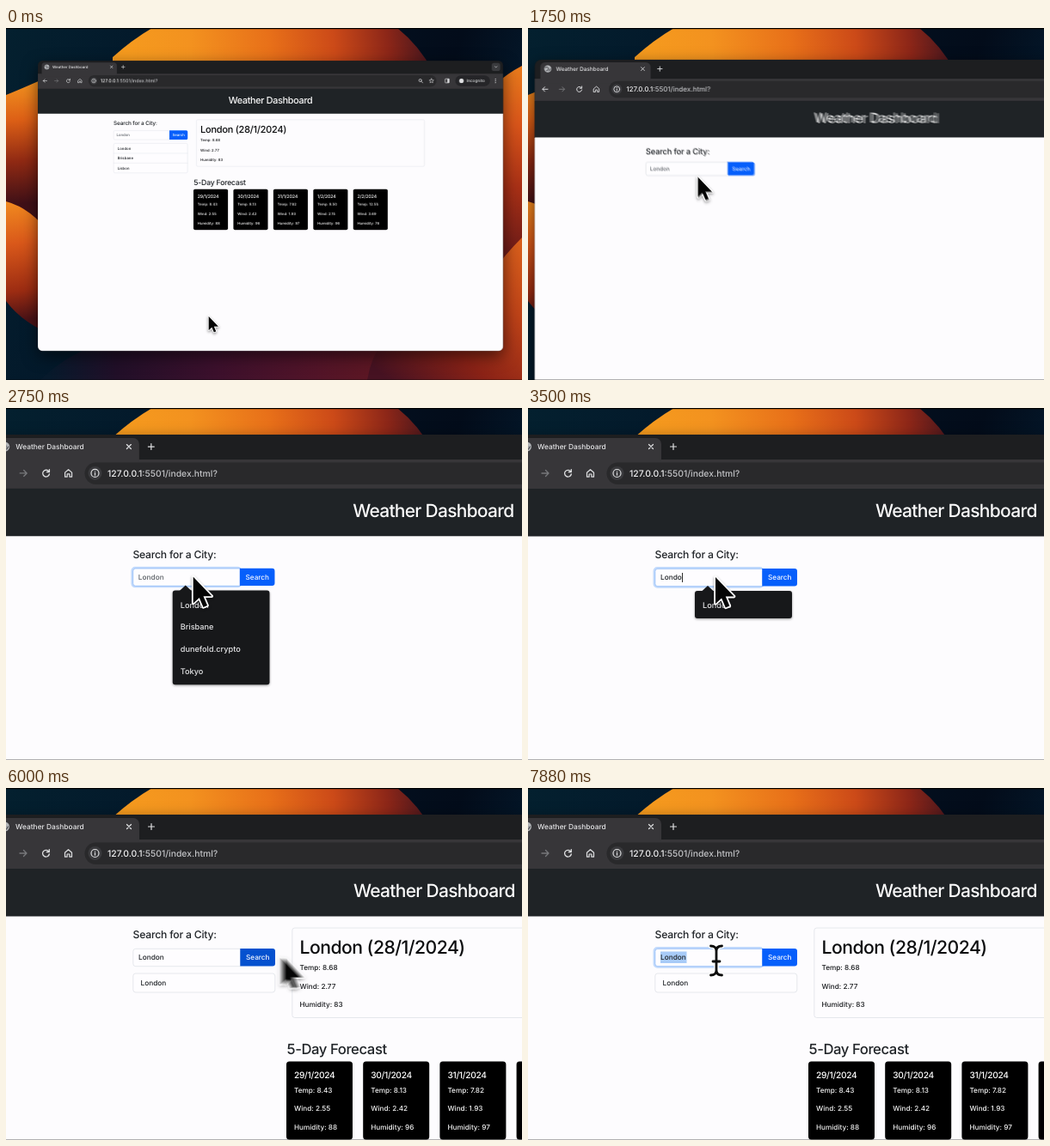
An HTML page with a canvas for the animation above (8 s loop, 600 px wide and 410 px high).

```html
<!DOCTYPE html>
<html lang="en">
<head>
<meta charset="utf-8">
<title>Weather Dashboard</title>
<style>
html, body { margin: 0; width: 100%; height: 100%; overflow: hidden; background: #03101f; }
canvas { display: block; width: 600px; height: 410px; }
</style>
</head>
<body>
<canvas id="stage" width="600" height="410"></canvas>
<script>
const W = 600, H = 410, LOOP = 8000, STEP = 125, SHUTTER = 14, SAMPLES = 8;
const out = document.getElementById('stage').getContext('2d');

function layer() {
  const c = document.createElement('canvas');
  c.width = W;
  c.height = H;
  return c.getContext('2d');
}
const wall = layer(), g = layer();
g.textRendering = 'geometricPrecision';

// ---------- drawing helpers ----------
function text(str, x, y, size, color, weight = 450, tracking = 0) {
  g.font = `${weight} ${size}px Inter, "Open Sans", sans-serif`;
  g.letterSpacing = tracking * size + 'px';
  g.fillStyle = color;
  g.fillText(str, x, y);
}

function box(x, y, w, h, r, fill, stroke, lw = 0.8) {
  g.beginPath();
  g.roundRect(x, y, w, h, r);
  if (fill) { g.fillStyle = fill; g.fill(); }
  if (stroke) { g.strokeStyle = stroke; g.lineWidth = lw; g.stroke(); }
}

function line(d, x, y, color, lw = 1.3) {
  g.save();
  g.translate(x, y);
  g.strokeStyle = color;
  g.lineWidth = lw;
  g.lineCap = g.lineJoin = 'round';
  g.stroke(new Path2D(d));
  g.restore();
}

function disc(x, y, r, color) {
  g.beginPath();
  g.arc(x, y, r, 0, 7);
  g.fillStyle = color;
  g.fill();
}

// ---------- wallpaper ----------
function paint(d, from, to, stops) {
  const grad = wall.createLinearGradient(...from, ...to);
  stops.forEach(([at, color]) => grad.addColorStop(at, color));
  wall.fillStyle = grad;
  wall.fill(new Path2D(d));
}

function paintWall() {
  paint('M0 0H600V410H0Z', [0, 0], [600, 200], [[0, '#04202f'], [0.3, '#03182a'], [0.8, '#030c1a'], [1, '#041c30']]);
  paint('M170 0Q146 14 124 34V120H520Q505 40 455 0Z', [140, 30], [510, 0],
    [[0, '#f59a1e'], [0.2, '#f3921f'], [0.45, '#e87019'], [0.65, '#cc4a18'], [0.82, '#8c2618'], [1, '#2a1020']]);
  paint('M0 78Q20 70 60 52V240H0Z', [0, 65], [8, 205],
    [[0, '#f0901f'], [0.3, '#dd6016'], [0.65, '#8f2913'], [1, '#3f1017']]);
  paint('M0 202Q60 218 90 330L60 360Q20 345 0 318Z', [0, 204], [20, 340],
    [[0, '#f0891f'], [0.35, '#d9581a'], [0.75, '#9c2c12'], [1, '#4a1216']]);
  paint('M40 410Q90 360 190 350H600V410Z', [50, 400], [440, 390],
    [[0, '#071a2c'], [0.2, '#210f28'], [0.5, '#3c102c'], [0.8, '#521428'], [1, '#5e1722']]);
  paint('M600 44Q565 62 540 100V350H600Z', [580, 50], [590, 260],
    [[0, '#e8791c'], [0.3, '#d9551a'], [0.65, '#a83016'], [1, '#701c18']]);
  paint('M600 244Q560 284 540 330L440 362Q424 384 420 410H600Z', [600, 250], [450, 415],
    [[0, '#d9601c'], [0.3, '#bd4218'], [0.65, '#8a2216'], [1, '#461222']]);
}

// ---------- motion ----------
const smooth = k => k * k * (3 - 2 * k);

function camera(t) {
  const s = Math.max(0, t - 1434) * 0.0056;
  const p = 1 - (1 + s) * Math.exp(-s);
  const q = Math.min(1, Math.max(0, 1 - t / 250)) ** 2;
  return {
    z: 0.5 + 0.5 * p + 0.021 * q,
    x: 51.25 * (1 - p) - 3.05 * q,
    y: 28 * (1 - p) - 6.15 * q
  };
}

// time, x, y of the pointer in page space
const path = [
  [450, 360, 603], [1000, 245, 229], [1750, 227, 210], [2250, 218, 197],
  [3900, 218, 197], [4380, 297, 197], [5400, 297, 197], [5640, 400, 345],
  [5880, 365, 200], [6120, 279, 196], [6700, 225, 212], [7100, 219, 199]
];

function pointer(t) {
  const i = path.findIndex(k => k[0] > t);
  if (i === 0) return path[0].slice(1);
  if (i < 0) return path[path.length - 1].slice(1);
  const [a, b] = [path[i - 1], path[i]];
  const k = smooth((t - a[0]) / (b[0] - a[0]));
  return [a[1] + (b[1] - a[1]) * k, a[2] + (b[2] - a[2]) * k];
}

// ---------- browser ----------
const INK = '#dfe0e2', DIM = '#77787b';

function drawBrowser() {
  g.save();
  g.shadowColor = 'rgba(0,0,0,.55)';
  g.shadowBlur = 18;
  g.shadowOffsetY = 6;
  box(-21.5, 31, 1039, 649, 10, '#1d1e20');
  g.restore();

  g.beginPath();
  g.roundRect(-21.5, 31, 1039, 649, 10);
  g.clip();
  g.fillStyle = '#373639';
  g.fillRect(-22, 60, 1040, 34);
  box(-13, 35, 168, 32, 7, '#373639');
  g.fillStyle = '#1f2326';
  g.fillRect(-22, 94, 1040, 56);
  g.fillStyle = '#fdfcfe';
  g.fillRect(-22, 149.5, 1040, 532);

  disc(-1.5, 45, 5.5, '#b4b6b9');
  line('M-4 -2Q0 -4 1 -1T-2 3M2 3L4 0', -1.5, 45, '#45464a', 1.2);
  text('Weather Dashboard', 11, 48.2, 8.4, '#e4e4e6');
  line('M-2.5 -2.5L2.5 2.5M2.5 -2.5L-2.5 2.5', 143, 45, INK, 1.2);
  line('M-3.5 0H3.5M0 -3.5V3.5', 169, 45, INK, 1.2);
  box(992, 36, 19, 18, 5, '#3a3b3e');
  line('M-2.5 -1.2L0 1.2L2.5 -1.2', 1001.5, 45, INK, 1.2);

  line('M4 0H-4M-.5 -3.5L-4 0L-.5 3.5', -5.5, 76, INK);
  line('M-4 0H4M.5 -3.5L4 0L.5 3.5', 20, 76, DIM);
  line('M3.2 -2A3.9 3.9 0 1 0 3.8 1M3.8 -4.4V-1.4H.8', 46.5, 76, INK);
  line('M-4 -.8L0 -4.2L4 -.8V4.2H1.4V1H-1.4V4.2H-4Z', 72.5, 76, INK, 1.2);

  box(91.5, 63.5, 777, 25.5, 12.7, '#29292b');
  disc(103.5, 76, 8, '#3a3a3d');
  line('M4.5 0A4.5 4.5 0 1 1 -4.5 0A4.5 4.5 0 1 1 4.5 0M0 -.3V2.2M0 -2.2V-2.1', 103.5, 76, INK, 1.2);
  text('127.0.0.1', 118, 79.8, 10.4, '#f1f1f2');
  const host = g.measureText('127.0.0.1').width;
  text(':5501/index.html?', 118 + host, 79.8, 10.4, '#c3c4c7');

  line('M2 -1A3 3 0 1 1 -4 -1A3 3 0 1 1 2 -1M1.2 1.2L4.5 4.5', 833.5, 76, INK, 1.4);
  line('M0 -5L1.4 -1.7L5 -1.4L2.3 .9L3.1 4.4L0 2.5L-3.1 4.4L-2.3 .9L-5 -1.4L-1.4 -1.7Z', 857.5, 76, INK, 1.1);
  box(888, 71.5, 9, 9, 1, null, INK, 1.3);
  g.fillStyle = INK;
  g.fillRect(893, 71.5, 4, 9);
  box(911, 64, 77, 24, 12, '#252528');
  disc(924.5, 76, 5, INK);
  text('Incognito', 936, 79.3, 9.1, INK);
  [-4, 0, 4].forEach(d => disc(1000.5, 76 + d, 1.2, INK));

  text('Weather Dashboard', 404, 127.3, 21, '#fafafa', 500, -0.034);
}

// ---------- page ----------
const DARK = '#202428', EDGE = '#e0e3e8';
const days = [
  ['29/1/2024', '8.43', '2.55', 88], ['30/1/2024', '8.13', '2.42', 96],
  ['31/1/2024', '7.82', '1.93', 97], ['1/2/2024', '8.50', '2.15', 96],
  ['2/2/2024', '12.55', '3.69', 76]
];

function readings(x, y, [temp, wind, humidity], color) {
  [`Temp: ${temp}`, `Wind: ${wind}`, `Humidity: ${humidity}`]
    .forEach((s, i) => text(s, x, y + i * 21.5, 8.2, color));
}

function drawSearch(t, overButton) {
  const focus = (t >= 2250 && t < 4750) || t >= 7000;
  const typed = t >= 3000;
  const value = typed ? 'London'.slice(0, Math.floor((t - 3000) / STEP) + 1) : 'London';
  const active = (overButton && t > 3000) || (t >= 4750 && t < 7000);

  text('Search for a City:', 147.5, 175.2, 12.2, DARK, 500, -0.017);
  if (focus) box(146.8, 186.4, 126.4, 22, 3.5, null, '#c2dafc', 2.6);
  box(147.8, 187.3, 125, 20.4, [3, 0, 0, 3], '#fefdff', focus ? '#8db9f8' : EDGE);
  box(272.3, 187, 40.7, 20.5, [0, 3, 3, 0], active ? '#0551cf' : '#065ffb');
  text('Search', 279, 200.4, 8.2, '#f4f7ff');
  if (t >= 7250) {
    g.fillStyle = '#a8cbf8';
    g.fillRect(154, 190.5, 30.5, 13.5);
  }
  text(value, 154, 200.4, 8.3, typed ? DARK : '#5d6268');
  if (typed && t < 4750) {
    g.fillStyle = '#111';
    g.fillRect(154.3 + g.measureText(value).width, 192, 0.9, 11);
  }
}

function drawHistory(cities) {
  box(147.8, 216, 165, 22 * cities.length, 3, '#fefdff', EDGE);
  cities.forEach((city, i) => {
    if (i) line('M0 0H165', 147.8, 216 + 22 * i, EDGE, 0.8);
    text(city, 156.5, 230 + 22 * i, 8.3, DARK);
  });
}

function drawWeather() {
  box(332.8, 163, 509, 104.5, 3, null, EDGE);
  text('London (28/1/2024)', 341.5, 192.5, 21.2, '#0c0d0f', 500, -0.025);
  readings(341.5, 212, ['8.68', '2.77', 83], '#17191c');
  text('5-Day Forecast', 326.5, 310, 16.7, DARK, 500, -0.026);
  days.forEach(([date, ...values], i) => {
    const x = 326 + i * 89.2;
    box(x, 318.5, 77, 91, 3.5, '#000');
    text(date, x + 9, 338, 10.2, '#fff', 500, -0.03);
    readings(x + 9, 354.5, values, '#f4f4f4');
  });
}

function drawSuggestions(items) {
  g.save();
  g.shadowColor = 'rgba(0,0,0,.4)';
  g.shadowBlur = 3;
  g.shadowOffsetY = 1;
  box(194, 213, 113, 6 + 26 * items.length, 3, '#17181a');
  g.restore();
  g.fillStyle = '#17181a';
  g.fill(new Path2D('M202 213.5L209 207L216 213.5Z'));
  items.forEach((s, i) => text(s, 203, 233 + 26 * i, 9.2, '#e6e6e8'));
}

// ---------- pointers ----------
function drawPointer(kind, x, y) {
  g.save();
  g.translate(x, y);
  g.lineJoin = g.lineCap = 'round';
  if (kind === 'beam') {
    const d = 'M-6.5 -15Q0 -15 0 -9Q0 -15 6.5 -15M0 -9V13M-6.5 19Q0 19 0 13Q0 19 6.5 19M-4 3H4';
    line(d, 0, 0, '#fff', 5.6);
    line(d, 0, 0, '#0b0b0b', 2.8);
  } else {
    const hand = kind === 'hand';
    const shape = new Path2D(hand
      ? 'M-2.6 14V2Q-2.6 -.5 -.2 -.5T2.2 2V9Q4.8 7.5 6.4 10Q9 8.8 10.4 11.3Q14 10.5 14.3 14V17Q14 20 11.5 23V26.5H-1V24Q-4 20.5 -7 16Q-8.5 12.8 -6 12.4Q-4 12.5 -2.6 14Z'
      : 'M0 0V31L7.1 24.4L11.8 35.4L16.4 33.5L11.8 22.6H21.6Z');
    g.shadowColor = 'rgba(0,0,0,.4)';
    g.shadowBlur = 3;
    g.shadowOffsetY = 1.5;
    g.strokeStyle = hand ? '#080808' : '#fff';
    g.lineWidth = hand ? 2.4 : 3.6;
    g.stroke(shape);
    g.shadowColor = 'transparent';
    g.fillStyle = hand ? '#fff' : '#050505';
    g.fill(shape);
    if (hand) line('M2.6 15.5V21.5M6 15.5V21.5M9.4 15.5V21.5', 0, 0, '#080808', 1.5);
  }
  g.restore();
}

// ---------- scene ----------
// t picks the page state, ts the camera and pointer position
function drawScene(t, ts) {
  const cam = camera(ts);
  const [px, py] = pointer(ts), [hx, hy] = pointer(t);
  const inRow = hy > 187 && hy < 209;
  const overButton = inRow && hx > 272 && hx < 313;
  const overInput = inRow && hx > 147 && hx <= 272;

  g.setTransform(1, 0, 0, 1, 0, 0);
  g.drawImage(wall.canvas, 0, 0);
  g.setTransform(cam.z, 0, 0, cam.z, cam.x, cam.y);
  g.save();
  drawBrowser();
  drawSearch(t, overButton);
  if (t < 1375) drawHistory(['London', 'Brisbane', 'Lisbon']);
  if (t >= 4875) drawHistory(['London']);
  if (t < 1375 || t >= 4875) drawWeather();
  if (t >= 2375 && t < 3000) drawSuggestions(['London', 'Brisbane', 'dunefold.crypto', 'Tokyo']);
  if (t >= 3000 && t < 3875) drawSuggestions(['London']);
  g.restore();

  const kind = overButton && t > 3000 ? 'hand' : overInput && t > 6000 ? 'beam' : 'arrow';
  drawPointer(kind, px, py);

  g.setTransform(1, 0, 0, 1, 0, 0);
  g.fillStyle = '#000';
  g.fillRect(0, 0, W, 1.2);
  g.fillStyle = 'rgba(0,0,0,.3)';
  g.fillRect(0, H - 1, W, 1);
}

function frame() {
  const t = Math.floor((performance.now() % LOOP) / STEP) * STEP;
  if (t !== frame.last) {
    frame.last = t;
    // average several moments for motion blur
    for (let k = 0; k < SAMPLES; k++) {
      drawScene(t, t + (k / (SAMPLES - 1) - 0.5) * SHUTTER);
      out.globalAlpha = 1 / (k + 1);
      out.drawImage(g.canvas, 0, 0);
    }
  }
  requestAnimationFrame(frame);
}

paintWall();
frame();
</script>
</body>
</html>
```
